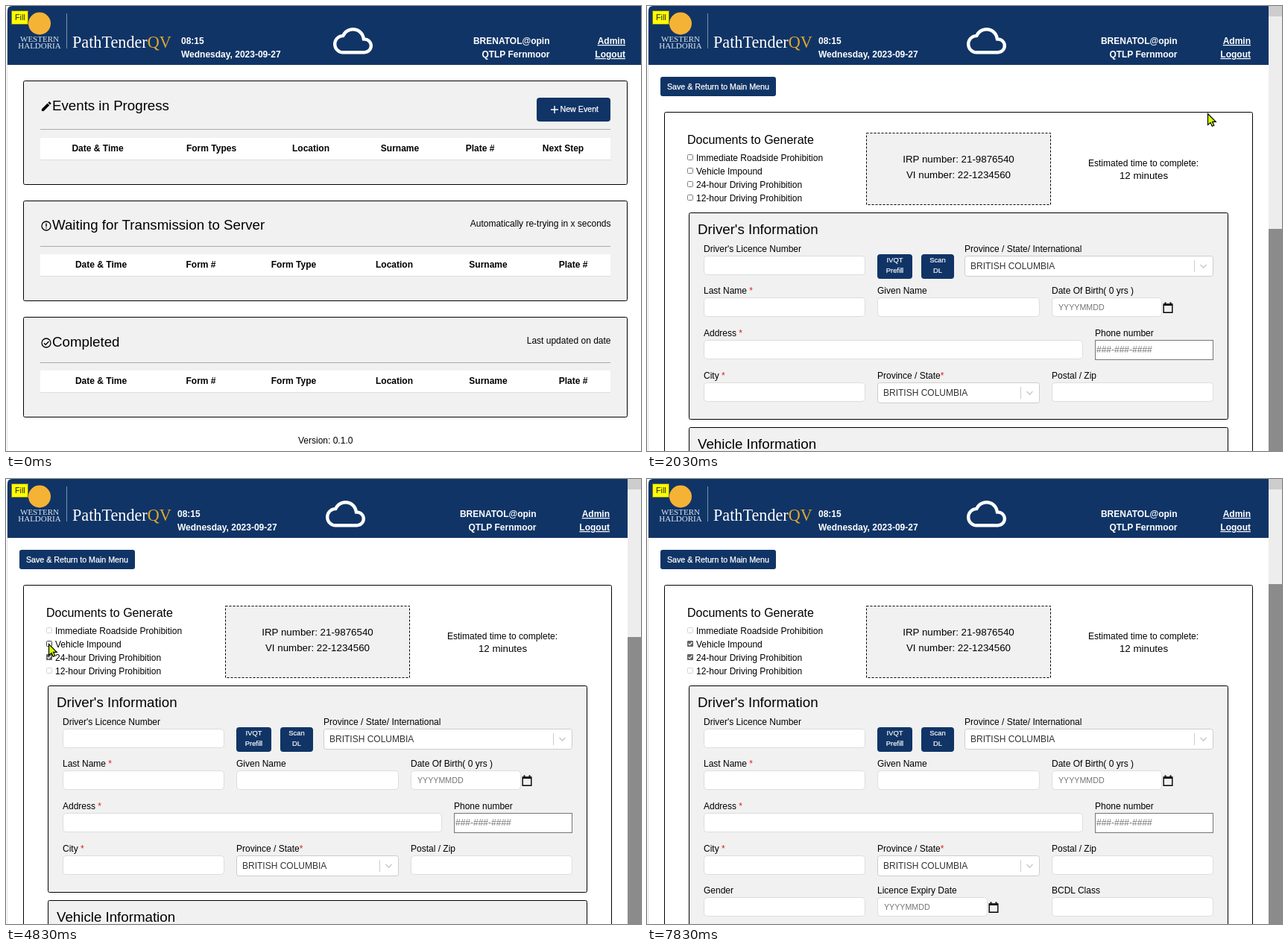
Animation, 852 px wide and 597 px high, one loop 8 s. Source, as an HTML page:

```html
<!DOCTYPE html>
<html lang="en">
<head>
<meta charset="utf-8">
<title>Roadside forms</title>
<style>
html, body { margin: 0; width: 100%; height: 100%; overflow: hidden; background: #fff; }
svg { display: block; width: 852px; height: 597px; }
text { font: 12px "Liberation Sans", Arial, sans-serif; white-space: pre; }
.b { font-weight: bold; }
.w { fill: #fff; }
.h { font-size: 18.72px; }
.t { font-size: 16px; }
.m { font-size: 13.33px; }
.p { font-size: 10.67px; fill: #757575; }
.btn { font-size: 10.67px; fill: #fff; stroke: #fff; stroke-width: .25px; }
.tiny { font-size: 9.33px; fill: #fff; stroke: #fff; stroke-width: .2px; }
.u { text-decoration: underline; }
.mark { font: 11px "Liberation Serif", serif; fill: #dfe6ef; }
.brand { font: 22.2px "Liberation Serif", serif; fill: #fff; }
</style>
</head>
<body>
<svg id="stage" viewBox="0 0 852 597"></svg>
<script>
const NAVY = '#103466', PANEL = '#f1f1f1', LOOP = 8000, TICK = 200 / 3;

const text = (x, y, s, cls = '', anchor = 'start') =>
  `<text x="${x}" y="${y}" class="${cls}" text-anchor="${anchor}">${s}</text>`;
const mid = (x, y, s, cls) => text(x, y, s, cls, 'middle');
const right = (x, y, s, cls) => text(x, y, s, cls, 'end');
const fillRect = (x, y, w, h, fill, r = 0, extra = '') =>
  `<rect x="${x}" y="${y}" width="${w}" height="${h}" rx="${r}" fill="${fill}" ${extra}/>`;
// Bordered box whose one pixel line lies inside the given edges
const box = (x1, y1, x2, y2, fill, line, r = 0, extra = '') =>
  fillRect(x1 + .5, y1 + .5, x2 - x1 - 1, y2 - y1 - 1, fill, r, `stroke="${line}" ${extra}`);
const path = (d, stroke, width = 1, fill = 'none') =>
  `<path d="${d}" fill="${fill}" stroke="${stroke}" stroke-width="${width}"/>`;
const group = (id, body) => `<g id="${id}">${body}</g>`;

const CLOUD = 'M19.35 10.04A7.49 7.49 0 0 0 12 4C9.11 4 6.6 5.64 5.35 8.04A5.994 5.994 0 0 0 0 14c0 3.31 2.69 6 6 6h13c2.76 0 5-2.24 5-5 0-2.64-2.05-4.78-4.65-4.96zM19 18H6c-2.21 0-4-1.79-4-4 0-2.05 1.53-3.76 3.56-3.97l1.07-.11.5-.95A5.469 5.469 0 0 1 12 6c2.62 0 4.88 1.86 5.39 4.43l.3 1.5 1.53.11A2.98 2.98 0 0 1 22 15c0 1.65-1.35 3-3 3z';
const PENCIL = 'M3 17.25V21h3.75L17.81 9.94l-3.75-3.75zM20.71 7.04a1 1 0 0 0 0-1.41l-2.34-2.34a1 1 0 0 0-1.41 0l-1.83 1.83 3.75 3.75z';

const header = (width, clockX, cloudX, userX, linkX) =>
  path(`M2 79V6Q2 0 8 0H${width}V79Z`, 'none', 0, NAVY) +
  '<circle cx="45" cy="23.500" r="15" fill="#f5b335"/>' +
  mid(45, 48, 'WESTERN', 'mark') + mid(45, 57, 'HALDORIA', 'mark') +
  path('M81.500 10V57', '#7b8fab') +
  text(89, 56, 'PathTender<tspan fill="#e3a82b">QV</tspan>', 'brand') +
  text(clockX, 51, '08:15', 'b w') + text(clockX, 69, 'Wednesday, 2023-09-27', 'b w') +
  `<path transform="translate(${cloudX} 20.200) scale(2.21)" d="${CLOUD}" fill="#fff"/>` +
  right(userX, 51, 'BRENATOL@opin', 'b w') + right(userX, 69, 'QTLP Fernmoor', 'b w') +
  right(linkX, 51, 'Admin', 'b w u') + right(linkX, 69, 'Logout', 'b w u');

const tableCard = (top, bottom, title, titleY, ruleY, headY, columns) =>
  box(23, top, 834, bottom, PANEL, '#000', 2) + text(62, titleY, title, 'h') +
  path(`M46 ${ruleY + .5}H811`, '#aaa') + fillRect(46, headY, 765, 29, '#fff') +
  path(`M46 ${headY + 29.5}H811`, '#ddd') +
  columns.map(([x, s]) => mid(x, headY + 18, s, 'b')).join('');

const listColumns = [[127.5, 'Date &amp; Time'], [261.5, 'Form #'], [386, 'Form Type'],
  [521, 'Location'], [647, 'Surname'], [761, 'Plate #']];

const menuPage = header(852, 235, 439, 729.5, 831) +
  tableCard(100, 240, 'Events in Progress', 140, 165, 177,
    [[123, 'Date &amp; Time'], [275.5, 'Form Types'], [409, 'Location'],
     [528.5, 'Surname'], [636, 'Plate #'], [747.5, 'Next Step']]) +
  `<path transform="translate(45.800 126.200) scale(.7)" d="${PENCIL}"/>` +
  fillRect(712, 123, 99, 32, NAVY, 4) + path('M731 139H741M736 134V144', '#fff', 1.4) +
  text(743.5, 142, 'New Event', 'btn') +
  tableCard(261, 396, 'Waiting for Transmission to Server', 300, 322, 333, listColumns) +
  '<circle cx="54" cy="295" r="6" fill="none" stroke="#000" stroke-width="1.300"/>' +
  path('M54 291.500V296M54 297.200V298.600', '#000', 1.4) +
  right(811.5, 296, 'Automatically re-trying in x seconds') +
  tableCard(417, 552, 'Completed', 457, 478, 489, listColumns) +
  '<circle cx="54" cy="452" r="6" fill="none" stroke="#000" stroke-width="1.300"/>' +
  path('M51 452.200L53.200 454.400L57.400 450', '#000', 1.4) +
  right(811.5, 453, 'Last updated on date') +
  mid(428.7, 587, 'Version: 0.1.0');

const star = '<tspan fill="#d22">*</tspan>';
const field = (x1, x2, y, label, shownLabelX = x1) =>
  text(shownLabelX, y - 5, label) + box(x1, y, x2, y + 26, '#fff', '#ddd', 4);
const select = (x1, x2, y, label) =>
  text(x1, y - 5, label) + box(x1, y, x2, y + 28, '#fff', '#ccc', 3) +
  `<text x="${x1 + 8}" y="${y + 18}" fill="#333">BRITISH COLUMBIA</text>` +
  path(`M${x2 - 25.5} ${y + 6}V${y + 22}`, '#ccc') +
  path(`M${x2 - 17.5} ${y + 12}l4 4l4-4`, '#ccc', 1.6);
const dateField = (x, y, label) => field(x, x + 148, y, label) + text(x + 9, y + 17, 'YYYYMMDD', 'p') +
  path(`M${x + 150.2} ${y + 9}h11.600v11.300h-11.600z`, '#000', 1.4) +
  path(`M${x + 150} ${y + 10}h12M${x + 152.500} ${y + 6.5}v2M${x + 159.500} ${y + 6.5}v2`, '#000', 2);
const smallButton = (x1, x2, a, b) => fillRect(x1, 333, x2 - x1, 33, NAVY, 4) +
  mid((x1 + x2) / 2, 344, a, 'tiny') + mid((x1 + x2) / 2, 358, b, 'tiny');

const formPage = fillRect(0, 0, 852, 597, '#fff') + header(834, 230, 429, 711.5, 810) +
  fillRect(18, 95, 155, 26, NAVY, 3) + text(27, 112, 'Save &amp; Return to Main Menu', 'btn') +
  box(23, 142, 813, 620, '#fff', '#000', 2) +
  text(54, 185, 'Documents to Generate', 't') +
  ['Immediate Roadside Prohibition', 'Vehicle Impound', '24-hour Driving Prohibition',
   '12-hour Driving Prohibition'].map((s, i) => text(66, 208 + 18 * i, s)).join('') +
  group('checks', '') +
  box(294, 170, 542, 267, PANEL, '#000', 0, 'stroke-dasharray="3 2"') +
  mid(418, 210, 'IRP number: 21-9876540', 'm') + mid(418, 231, 'VI number: 22-1234560', 'm') +
  mid(666, 215, 'Estimated time to complete:') + mid(666.5, 232, '12 minutes', 'm') +
  group('shortCard', box(56, 277, 780, 555, PANEL, '#000', 2) +
    box(56, 565, 780, 620, PANEL, '#000', 2) + text(68, 594, 'Vehicle Information', 'h')) +
  group('longCard', box(56, 277, 780, 620, PANEL, '#000', 2) +
    field(76, 293, 561, 'Gender') + dateField(309, 561, 'Licence Expiry Date') +
    field(543, 760, 561, 'BCDL Class')) +
  text(68, 306, "Driver's Information", 'h') +
  field(76, 293, 335, "Driver's Licence Number") +
  smallButton(309, 356, 'IVQT', 'Prefill') + smallButton(368, 412, 'Scan', 'DL') +
  select(426, 760, 335, 'Province / State/ International') +
  field(76, 293, 391, 'Last Name ' + star) + field(309, 527, 391, 'Given Name') +
  dateField(543, 391, 'Date Of Birth( 0 yrs )') +
  field(76, 585, 448, 'Address ' + star) +
  text(601, 443, 'Phone number') + box(601, 448, 760, 475, '#fff', '#767676') +
  '<text x="603" y="465" fill="#757575">###-###-####</text>' +
  field(76, 293, 505, 'City ' + star) + select(309, 527, 505, 'Province / State' + star) +
  field(543, 760, 505, 'Postal / Zip') +
  fillRect(834, 0, 18, 597, '#8b8b8b') + fillRect(834, 0, 18, 14, '#cdcdcd') +
  '<rect id="thumb" x="834" y="14" width="18" fill="#ededed"/>';

const $ = id => document.getElementById(id);
$('stage').innerHTML = fillRect(0, 0, 852, 597, '#fff') +
  group('menu', menuPage) + group('form', formPage) +
  path('M1.500 8V597', '#e2e2e2') +
  box(7, 6, 30, 25, '#ff0', '#77772a') + text(12, 19, 'Fill', 'p" style="fill:#222') +
  group('cursor',
    group('arrow', path('M.5 .5V15.500L4 12.400L6.300 17.300L8.800 16.200L6.600 11.300H11.200Z', '#000', 1.2, '#d4ff00')) +
    group('hand', path('M-1.800 11V1.800Q0-.6 1.800 1.800V7Q3.800 6 5 7.600Q7 6.800 7.800 8.400Q9.800 8 9.800 10.200V14Q9.600 17 8 20H-.5Q-3 15.500-5 12.300Q-4.600 9.600-1.800 11.800Z', '#000', 1.2, '#d4ff00') +
      path('M1.800 7V11M5 8V11.500M7.800 9V12', '#000')));

// Cursor tip: [time, x, y]
const route = [
  [500, 841, 276], [700, 822, 258], [1000, 779, 198], [1200, 754, 163], [1300, 749, 157], [1500, 752, 143],
  [2033, 752, 144], [2433, 752, 144], [2700, 590, 168], [2900, 340, 228], [3100, 160, 256], [3300, 86, 243],
  [3500, 67, 240], [3633, 57, 240], [4033, 57, 240], [4633, 57, 221], [5033, 57, 221],
  [5300, 36, 199], [5600, 7, 165], [5767, 11, 149], [5833, 12, 130], [6300, 22, 62],
  [6700, 13, 20], [6833, 12, 10], [7633, 12, 10], [7767, 8, 9]];

function tipAt(t) {
  const i = Math.max(0, Math.min(route.length - 2, route.findIndex(k => k[0] > t) - 1));
  const [t0, x0, y0] = route[i], [t1, x1, y1] = route[i + 1];
  const k = Math.max(0, Math.min(1, (t - t0) / (t1 - t0)));
  return [Math.round(x0 + (x1 - x0) * k), Math.round(y0 + (y1 - y0) * k)];
}

const show = (id, on) => { $(id).style.display = on ? '' : 'none'; };

function checkbox(i, checked, disabled, hover) {
  const y = 199 + 18 * i;
  if (checked) return fillRect(54, y, 8, 8, '#626262', 1) + path(`M55.600 ${y + 4}l1.700 1.800l3.200-3.800`, '#fff', 1.2);
  return box(54, y, 62, y + 8, '#fff', disabled ? '#d4d4d4' : hover ? '#3c3c3c' : '#808080', 1);
}

function draw(time) {
  // The screen refreshes every 1/15 s
  const t = 500 + Math.floor((time - 500 + 7) / TICK) * TICK + .5;
  const first = t >= 4033, second = t >= 5033;
  const [x, y] = tipAt(t);
  const hand = (t >= 1366 && t < 2033) || t >= 6766;
  show('menu', t < 2033);
  show('form', t >= 2033);
  show('shortCard', !second);
  show('longCard', second);
  show('cursor', t >= 500 && t < 7833);
  show('arrow', !hand);
  show('hand', hand);
  $('cursor').setAttribute('transform', `translate(${x} ${y})`);
  $('thumb').setAttribute('height', (second ? 141 : first ? 212 : 299) - 14);
  $('checks').innerHTML = [0, 1, 2, 3].map(i => checkbox(i,
    (i === 2 && first) || (i === 1 && second),
    first && i % 3 === 0,
    (i === 2 && t >= 3300) || (i === 1 && t >= 4500))).join('');
}

function frame() {
  draw(performance.now() % LOOP);
  requestAnimationFrame(frame);
}
frame();
</script>
</body>
</html>
```
